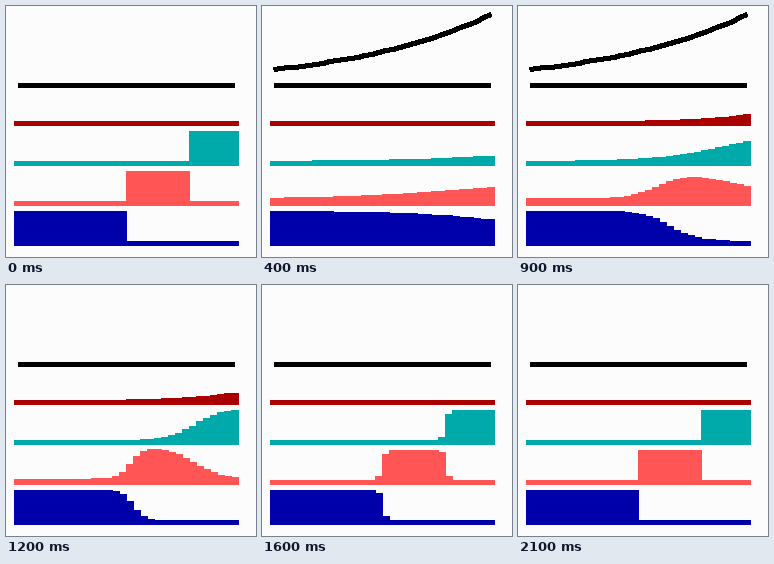
A matplotlib script that plays this animation: 250 px wide and 251 px high, repeating every 2200 ms.

```python
import numpy as np
import matplotlib.pyplot as plt
from matplotlib.animation import FuncAnimation
from matplotlib.patches import Rectangle

W, H, DPI = 250, 251, 64
CELLS, STEPS = 32, 22
SIGNAL_OFF = 11
LOW, SPAN = 5, 30

# colour and baseline of each row
ROWS = [("#0000aa", 240), ("#ff5555", 200), ("#00aaaa", 160), ("#aa0000", 120)]

cell = np.arange(CELLS)
u = cell / (CELLS - 1)


def front(center, width):
    """Smooth step from 0 to 1 along the row of cells."""
    return (1 + np.tanh((cell - center) / (2 * width))) / 2


def heights(step):
    t = step or STEPS  # the loop opens on its settled state
    onset = min(1, (t - 1) / 3)
    leak = 2.5 * onset * np.exp(-0.55 * max(0, t - SIGNAL_OFF))

    # both fronts travel in from the right and sharpen on the way
    travel = np.exp(-0.026 * t**2)
    first = onset * front(15.5 + 28 * travel, 9.5 * np.exp(-0.3 * (t - 4)))
    second = onset * front(24.5 + 34 * travel,
                           10 * np.exp(-0.026 * (t - 4) ** 2))

    gain = SPAN + leak
    blue = LOW + SPAN * (1 - first ** (1 + 0.2 * leak))
    coral = LOW + leak + gain * first * (1 - second)
    teal = LOW + gain * second
    red = LOW + 9 * np.exp(-((t - 10.7) / 3) ** 2) * u**4
    return blue, coral, teal, red


fig = plt.figure(figsize=(W / DPI, H / DPI), dpi=DPI, facecolor="#fcfcfc")
ax = fig.add_axes([0, 0, 1, 1])
ax.axis("off")

ax.add_patch(Rectangle((12, 77), 217, 5, fc="black", lw=0, antialiased=False))
curve, = ax.plot(12 + 217 * u, 79.5 - np.round(16 * np.exp(1.49 * u)),
                 color="black", lw=4 * 72 / DPI, solid_capstyle="butt",
                 antialiased=False)

# neighbouring bars share their partly covered pixel column
edges = 8 + 225 / CELLS * np.arange(CELLS + 1)
left = np.floor(edges[:-1])
width = np.ceil(edges[1:]) - left
bars = [ax.bar(left, -LOW, width, bottom=base, align="edge", color=color,
               lw=0, antialiased=False) for color, base in ROWS]
ax.set(xlim=(0, W), ylim=(H, 0))


def draw(step):
    curve.set_visible(0 < step < SIGNAL_OFF)
    for row, tops in zip(bars, heights(step)):
        for bar, top in zip(row, tops):
            bar.set_height(-np.round(top))
    return [curve]


anim = FuncAnimation(fig, draw, frames=STEPS, init_func=lambda: draw(0),
                     interval=100, repeat=True, repeat_delay=0)
plt.show()
```
